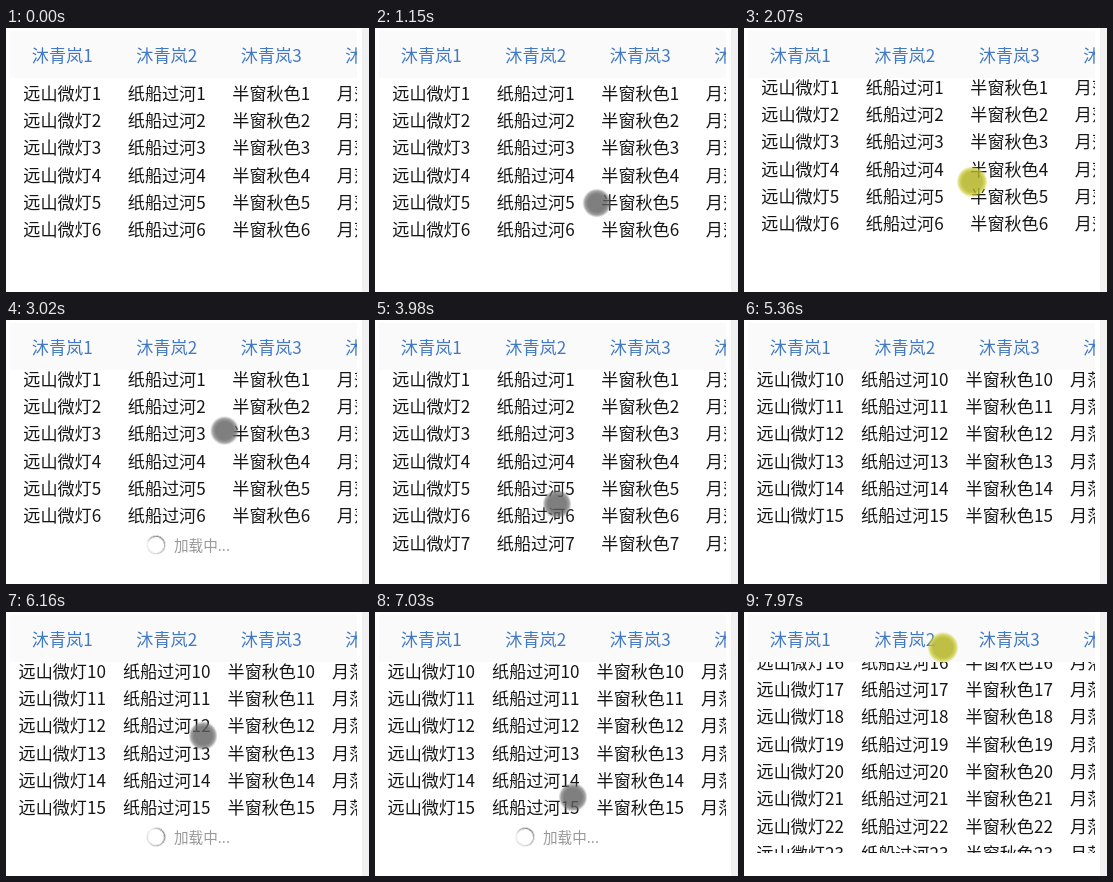
Animation, 363 px wide and 264 px high, one loop 8 s. Source, as an HTML page:

```html
<!DOCTYPE html>
<html lang="zh-CN">
<head>
<meta charset="utf-8">
<style>
html, body { margin: 0; width: 100%; height: 100%; overflow: hidden; background: #fff; }
body { position: relative; font: 17.1px "Noto Sans CJK SC", "Noto Sans CJK", "Noto Sans CJK JP", sans-serif; color: #151515; }
body > div { position: absolute; }
.gutter { left: 356px; top: 0; width: 7px; height: 264px; background: #f1f1f1; }
.head, .view { left: 4px; width: 347px; overflow: hidden; }
.head { top: 3px; height: 47px; line-height: 48px; background: #fafafa; color: #4179c4; }
.view { top: 50px; height: 191px; }
.row { display: flex; width: 418px; }
.row span { flex: 0 0 104.5px; text-align: center; white-space: nowrap; }
.list { position: absolute; top: .6px; left: 0; line-height: 27.35px; animation: scroll 8s linear infinite; }
.list .row { height: 27.35px; }
.batch1 { animation: batch1 8s step-end infinite; }
.batch2 { animation: batch2 8s step-end infinite; }

.loader { left: 139px; top: 210px; height: 31px; line-height: 30px; font-size: 14.6px; color: #999; animation: loading 8s step-end infinite; }
.loader span { position: absolute; left: 29px; white-space: nowrap; }
.spinner {
  position: absolute; left: 1px; top: 5px; width: 20px; height: 20px; border-radius: 50%;
  background: conic-gradient(#8d8787, #d8d4d4 45%, #f0eeee 75%, #8d8787);
  -webkit-mask: radial-gradient(circle, transparent 7.6px, #000 8.2px, #000 9.2px, transparent 9.8px);
  mask: radial-gradient(circle, transparent 7.6px, #000 8.2px, #000 9.2px, transparent 9.8px);
  animation: spin 1s linear infinite;
}

.touch { left: 0; top: 0; animation: move 8s linear infinite; }
.touch i { position: absolute; left: -16px; top: -16px; width: 32px; height: 32px; border-radius: 50%; }
.idle { background: radial-gradient(circle, rgba(95,95,95,.8) 9px, rgba(115,115,115,.68) 12px, rgba(140,140,140,0) 14.5px); animation: idle 8s step-end infinite; }
.down { background: radial-gradient(circle, rgba(178,178,30,.82) 10px, rgba(205,205,55,.75) 13px, rgba(225,225,90,0) 15.6px); animation: down 8s step-end infinite; }

@keyframes scroll {
  0%, 24% { transform: translateY(0); }
  25.2%, 55.4% { transform: translateY(-6px); }
  60% { transform: translateY(-95.6px); }
  65.25% { transform: translateY(-221px); }
  66.1% { transform: translateY(-242px); }
  67%, 89.9% { transform: translateY(-252px); }
  99.6% { transform: translateY(-424.5px); }
  100% { transform: translateY(-430px); }
}
@keyframes batch1 { 0% { visibility: hidden; } 45.5%, 100% { visibility: visible; } }
@keyframes batch2 { 0% { visibility: hidden; } 89.1%, 100% { visibility: visible; } }
@keyframes loading {
  0%, 45.5%, 89.1%, 100% { visibility: hidden; }
  26.6%, 69.4% { visibility: visible; }
}
@keyframes spin { to { transform: rotate(360deg); } }
@keyframes idle {
  0%, 33.6%, 68% { opacity: 1; }
  23.9%, 55.3%, 90%, 100% { opacity: 0; }
}
@keyframes down {
  0%, 33.6%, 68% { opacity: 0; }
  23.9%, 55.3%, 90%, 100% { opacity: 1; }
}
@keyframes move {
  0%, 4.25% { transform: translate(328px, 282px); }
  7.5% { transform: translate(262px, 215px); }
  11%, 13.5% { transform: translate(223px, 172px); }
  18.75% { transform: translate(216px, 190px); }
  23.4% { transform: translate(222px, 192px); }
  24.1% { transform: translate(223px, 188px); }
  25.875% { transform: translate(228px, 154px); }
  28.75% { transform: translate(234px, 95px); }
  31.25% { transform: translate(238px, 62px); }
  34.5% { transform: translate(237px, 78px); }
  43.9% { transform: translate(184px, 172px); }
  46.4%, 48.1% { transform: translate(183px, 180px); }
  49.75% { transform: translate(182px, 184px); }
  53.25%, 55.4% { transform: translate(183px, 194px); }
  60% { transform: translate(188px, 104px); }
  65.25%, 68.75% { transform: translate(196px, -20px); }
  69.5% { transform: translate(197px, 36px); }
  75% { transform: translate(198px, 105px); }
  79.5% { transform: translate(196px, 147px); }
  87.875% { transform: translate(198px, 185px); }
  89.9% { transform: translate(198px, 208px); }
  99.6% { transform: translate(199px, 36px); }
  100% { transform: translate(199px, 31px); }
}
</style>
</head>
<body>
<div class="gutter"></div>
<div class="head"></div>
<div class="view"><div class="list"></div></div>
<div class="loader"><i class="spinner"></i><span>加载中...</span></div>
<div class="touch"><i class="idle"></i><i class="down"></i></div>
<script>
const singer = '沐青岚';
const songs = ['远山微灯', '纸船过河', '半窗秋色', '月落松间'];

function addRow(parent, cells, cls = '') {
  const row = document.createElement('div');
  row.className = 'row ' + cls;
  for (const text of cells) {
    const cell = document.createElement('span');
    cell.textContent = text;
    row.append(cell);
  }
  parent.append(row);
}

addRow(document.querySelector('.head'), songs.map((_, i) => singer + (i + 1)));

const list = document.querySelector('.list');
for (let n = 1; n <= 24; n++) {
  const batch = n > 15 ? 'batch2' : n > 6 ? 'batch1' : '';
  addRow(list, songs.map(song => song + n), batch);
}
</script>
</body>
</html>
```
